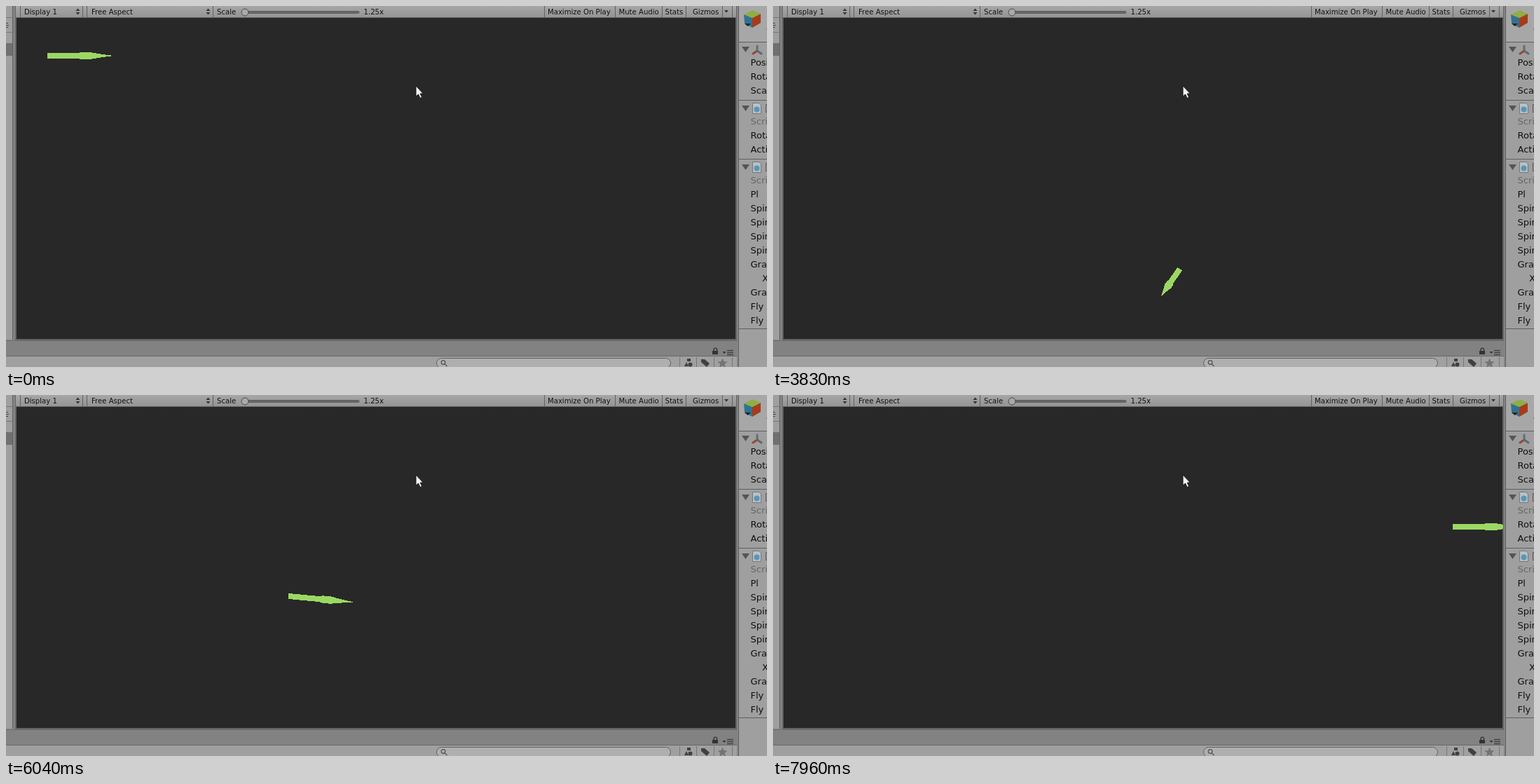
These frames come from a looping animation (1086x515 px, 8 s). An HTML page:

```html
<!DOCTYPE html>
<html lang="en">
<head>
<meta charset="utf-8">
<title>Knife throw</title>
<style>
html, body { margin: 0; width: 100%; height: 100%; overflow: hidden; background: #9f9f9f; }
svg { display: block; width: 1086px; height: 515px; }
text { font-family: "DejaVu Sans", sans-serif; font-size: 10.1px; fill: #101010; }
.panel text { font-size: 13px; }
.panel .dim { fill: #666; }
</style>
</head>
<body>
<svg viewBox="0 0 1086 515" xmlns="http://www.w3.org/2000/svg">
  <defs>
    <linearGradient id="bar" x1="0" y1="0" x2="0" y2="1">
      <stop offset="0" stop-color="#a6a6a6"/><stop offset="1" stop-color="#959595"/>
    </linearGradient>
    <clipPath id="view"><rect x="15" y="17" width="1027" height="459"/></clipPath>
  </defs>

  <rect width="1086" height="515" fill="#848484"/>

  <!-- left strip -->
  <rect width="9" height="476" fill="#9f9f9f"/>
  <path d="M0 16.5H9M0 37.5H9" stroke="#777"/>
  <path d="M0 24.5H3M0 27.5H4M0 30.5H3" stroke="#444"/>
  <rect y="53" width="9" height="18" fill="#707070"/>
  <path d="M9.5 0V476" stroke="#606060"/>

  <!-- game view -->
  <rect x="13" width="1030" height="477" fill="#656565"/>
  <rect x="14" width="1028" height="16" fill="url(#bar)"/>
  <rect x="15" y="17" width="1026" height="458" fill="#282828"/>
  <g id="seps" stroke="#606060"></g>
  <g id="labels"></g>
  <g fill="#333">
    <path id="updown" d="M99.5 7l3-3.5 3 3.5zM99.5 9h6l-3 3.5z"/>
    <use href="#updown" x="186"/>
    <path d="M1025 6h6l-3 3.5z"/>
  </g>
  <rect x="340" y="7.5" width="164" height="3" rx="1.5" fill="#686868" stroke="#555" stroke-width=".8"/>
  <circle cx="341" cy="9" r="5" fill="#aaa" stroke="#4a4a4a"/>
  <g clip-path="url(#view)">
    <path id="knife" fill="#9bd863" shape-rendering="crispEdges"/>
  </g>
  <path d="M585 114v15l3.5-3 2.500 5.500 2.600-1.200-2.500-5.300h4.200z" fill="#f4f4f4" stroke="#111" stroke-width=".9"/>

  <!-- bottom strip -->
  <rect y="477" width="1043" height="23" fill="#828282"/>
  <path d="M0 477.5H1043" stroke="#6f6f6f"/>
  <rect y="500" width="1043" height="15" fill="#a0a0a0"/>
  <path d="M0 499.5H1043" stroke="#696969"/>
  <path d="M961.5 501v14M985.5 501v14M1010.5 501v14M1036.5 501v14" stroke="#777"/>
  <rect x="614.5" y="502.5" width="334" height="14" rx="7" fill="#afafaf" stroke="#606060"/>
  <g fill="none" stroke="#555" stroke-width="1.3">
    <circle cx="624" cy="508.5" r="2.8"/><path d="M626 510.5l3.5 3.500"/>
  </g>
  <rect x="1008" y="492" width="8" height="5" fill="#333"/>
  <path d="M1010 492v-1.5a2.300 2.300 0 0 1 4.600 0v1.500" fill="none" stroke="#333" stroke-width="1.3"/>
  <path d="M1022.5 493h5l-2.500 3z" fill="#333"/>
  <path d="M1029 491.5h9M1029 494.5h9M1029 497.5h9" stroke="#444" stroke-width="1.3"/>
  <g fill="#404040">
    <path d="M968 514l3-6 3 6z"/><circle cx="976.5" cy="511.5" r="3"/><rect x="972" y="503" width="5" height="4"/>
    <path d="M992 504h5l7 6-4 5-8-7z"/>
  </g>
  <path d="M1022.5 502.5l2 4.600 5 .4-3.800 3.300 1.200 5-4.400-2.700-4.400 2.700 1.200-5-3.800-3.300 5-.4z" fill="#747474"/>

  <!-- right panel -->
  <g class="panel">
    <rect x="1046" width="40" height="515" fill="#9f9f9f"/>
    <rect x="1046" width="40" height="51" fill="#a7a7a7"/>
    <path d="M1045.5 0V515" stroke="#606060"/>
    <path d="M1046 51.5h40M1046 134.5h40M1046 218.5h40M1046 460.5h40" stroke="#5f5f5f"/>
    <path d="M1053 12l12 5v14l-11-6z" fill="#34718f"/>
    <path d="M1065 17l12-6v13l-12 7z" fill="#a63c1a"/>
    <path d="M1053 12l13-6 11 5-12 6z" fill="#8fae45"/>
    <path d="M1054 25h9l-4.500 4z" fill="#222"/>
    <path d="M1085 33h1" stroke="#444"/>
    <g fill="none" stroke-width="3" stroke-linecap="round">
      <path d="M1072 64v-7" stroke="#5f6f80"/><path d="M1072 64l-6 4" stroke="#96472c"/><path d="M1072 64l6 4" stroke="#5c6a70"/>
    </g>
    <g id="heads"></g>
    <g id="fields"></g>
  </g>
</svg>
<script>
const $ = id => document.getElementById(id);
const label = (x, y, s, cls = "") => `<text x="${x}" y="${y}" class="${cls}">${s}</text>`;

$("seps").innerHTML = [20, 109, 115, 295, 768, 869, 936, 970, 1022, 1036]
  .map(x => `<path d="M${x}.5 0V16"/>`).join("");
$("labels").innerHTML = [[26, "Display 1"], [122, "Free Aspect"], [301, "Scale"], [510.5, "1.25x"],
  [773, "Maximize On Play"], [874.5, "Mute Audio"], [940.5, "Stats"], [980, "Gizmos"]]
  .map(([x, s]) => label(x, 12, s)).join("");

// panel sections repeat every 84 px, their rows every 20 px
$("heads").innerHTML = [0, 1, 2].map(i => {
  const y = 62 + 84 * i;
  return `<path d="M1050 ${y - 4}h11l-5.5 8z" fill="#555"/>` + (i ?
    `<path d="M1065.5 ${y - 7.5}h9l3 3v12h-12z" fill="#b9c1c5" stroke="#72797d"/>
     <circle cx="1071.5" cy="${y + 1.5}" r="4" fill="#5896b7"/>
     <path d="M1087 ${y - 5.5}h-2.5v11h2.5" fill="none" stroke="#555"/>` : "");
}).join("");
$("fields").innerHTML = ["Position,Rotation,Scale", "Script,Rotate,Active",
  "Script,Pl,Spin,Spin,Spin,Spin,Gravity,X,Gravity,Fly Angle,Fly Force"]
  .map((rows, i) => rows.split(",").map((s, j) =>
    label(s === "X" ? 1079 : 1062.5, 84.5 + 84 * i + 20 * j, s, s === "Script" ? "dim" : "")).join("")).join("");

const LOOP = 8000, LEN = 92, STEP = 50;
const REST = 28;   // aim angle of the second throw

// aiming: time, degrees
const aim = [[510, 0], [1030, 42.8], [1340, 42.8], [1600, 64], [1840, 77]];

// held knife turning round the hand
function held(deg) {
  const r = deg * Math.PI / 180, c = Math.cos(r), s = Math.sin(r);
  const k = LEN / 2 - 19.7;
  return [78.7 + c * k + s * 3.3, 74.3 + s * k - c * 3.3, LEN * c, LEN * s];
}

// path: time, x, y; the nose levels out until path[level], then spins for `spin` ms
function flight(start, deg, level, spin, depth, points) {
  const path = [[start, ...held(deg).slice(0, 2)], ...points];
  return { start, deg, level, spin, depth, path };
}
const throws = [
  flight(1950, 77, 2900, 1368, 1.6, [[2690, 267, 476.5], [2900, 380, 515], [3250, 530, 415],
    [3830, 567.5, 394], [4250, 655, 418], [4640, 772, 402], [5170, 812, 432]]),
  flight(5340, REST, 6130, 1830, 1.22, [[5490, 170.5, 126.5], [6130, 495, 299], [6590, 679, 214],
    [7000, 752, 191], [7650, 932, 165], [7960, 1016, 188]])
];

// index of the span, progress through it in steps, time of that step
function span(keys, t) {
  let i = 0;
  while (i < keys.length - 2 && t >= keys[i + 1][0]) i++;
  const a = keys[i][0], d = keys[i + 1][0] - a, n = Math.round(d / STEP);
  const u = Math.floor(Math.max(0, Math.min(1, (t - a) / d)) * n + 1e-6) / n;
  return [i, u, a + u * d];
}

function curve(keys, i, u) {
  const rate = (j, c) => (keys[j + 1][c] - keys[j][c]) / (keys[j + 1][0] - keys[j][0]);
  const slope = (j, c) => {
    if (j === 0) return rate(0, c);
    if (j === keys.length - 1) return rate(j - 1, c);
    const h = keys[j][0] - keys[j - 1][0], g = keys[j + 1][0] - keys[j][0];
    return (rate(j - 1, c) * g + rate(j, c) * h) / (h + g);
  };
  const p = keys[i], q = keys[i + 1], d = q[0] - p[0], w = 1 - u;
  return [1, 2].map(c => p[c] * (1 + 2 * u) * w * w + q[c] * u * u * (3 - 2 * u)
    + d * (slope(i, c) * u * w * w - slope(i + 1, c) * u * u * w));
}

function nose(f, t) {
  if (t < f.level) {
    const q = (t - f.start) / (f.level - f.start);
    const r = f.deg * (1 - q ** 1.6) * Math.PI / 180;
    return [LEN * Math.cos(r), LEN * Math.sin(r)];
  }
  const p = Math.min(1, (t - f.level) / f.spin);
  return [LEN * (1 - f.depth * Math.abs(Math.sin(Math.PI * p)) ** 1.3), -42 * Math.sin(2 * Math.PI * p)];
}

function pose(t) {
  const f = throws.find(({ path }) => t >= path[0][0] && t < path.at(-1)[0]) || (t > 7900 && throws[1]);
  if (f) {
    const [i, u, at] = span(f.path, t);
    return [...curve(f.path, i, u), ...nose(f, at)];
  }
  if (t > throws[0].start) return held(REST);
  const [i, u] = span(aim, t);
  return held(aim[i][1] + (aim[i + 1][1] - aim[i][1]) * u);
}

// half widths along the blade
const edge = [[0, 4], [.48, 4], [.53, 5.2], [.66, 5.2], [.74, 3.8], [.88, 1.7], [1, .4]];
const outline = [...edge, ...edge.map(([u, w]) => [u, -w]).reverse()];

function draw(now) {
  const [x, y, vx, vy] = pose(now % LOOP);
  const len = Math.hypot(vx, vy) || 1, nx = -vy / len, ny = vx / len;
  $("knife").setAttribute("d", "M" + outline.map(([u, w]) =>
    (x + vx * (u - .5) + nx * w).toFixed(2) + " " + (y + vy * (u - .5) + ny * w).toFixed(2)).join("L") + "Z");
}

let start;
function tick(now) {
  start ??= now;
  draw(now - start);
  requestAnimationFrame(tick);
}
draw(0);
requestAnimationFrame(tick);
</script>
</body>
</html>
```
